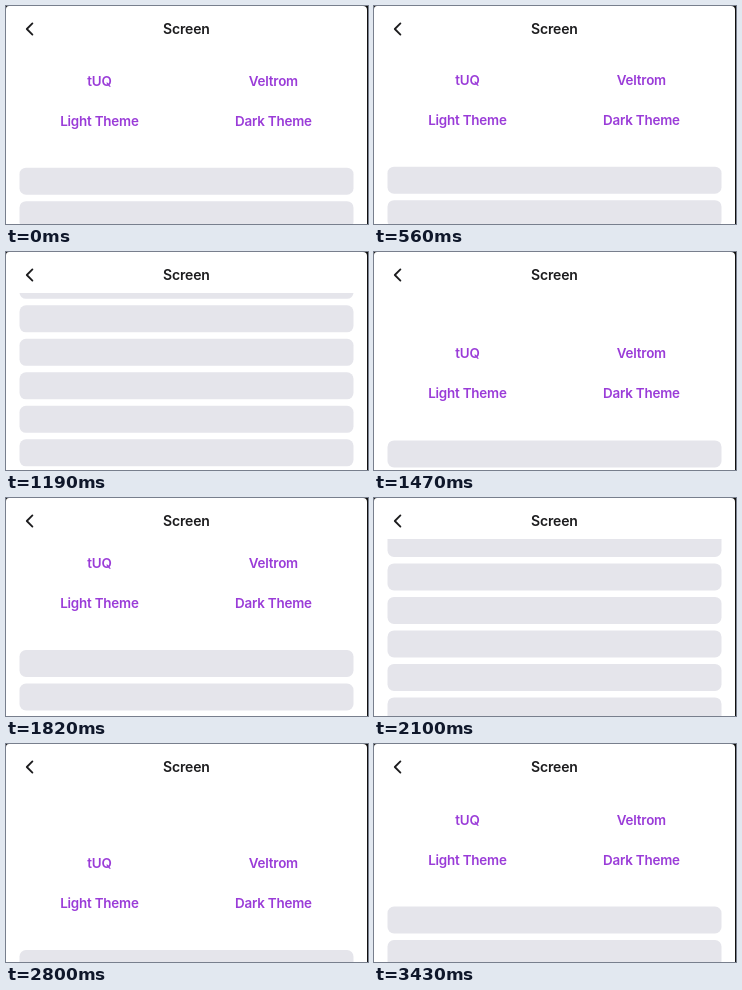
An HTML page that plays this animation: 362 px wide and 218 px high, repeating every 3500 ms.

```html
<!DOCTYPE html>
<html lang="en">
<head>
<meta charset="utf-8">
<title>Scrolling screen</title>
<style>
  html, body { margin: 0; width: 100%; height: 100%; overflow: hidden; background: #111; }
  svg { display: block; width: 362px; height: 218px; }
  text { font: 600 13.4px Inter, "Liberation Sans", sans-serif; letter-spacing: -.015em; text-anchor: middle; }
  .title { font-size: 14px; letter-spacing: -.01em; fill: #1c1c1e; }
  .links { fill: #9a3cd8; }
  .rows { fill: #e5e5eb; }
</style>
</head>
<body>
<svg viewBox="0 0 362 218">
  <defs>
    <clipPath id="view"><rect y="41" width="361" height="177"/></clipPath>
  </defs>
  <path d="M0 218V3Q0 0 3 0H357Q361 0 361 4V218Z" fill="#fff"/>
  <g clip-path="url(#view)">
    <g id="content">
      <g class="links">
        <text x="93.4" y="79.8">tUQ</text>
        <text x="267.4" y="79.8">Veltrom</text>
        <text x="93.4" y="119.8">Light Theme</text>
        <text x="267.4" y="119.8">Dark Theme</text>
      </g>
      <g class="rows" id="rows"></g>
    </g>
  </g>
  <path d="M26.4 17.4 20.8 23 26.4 28.6" fill="none" stroke="#1c1c1e" stroke-width="1.8" stroke-linecap="round" stroke-linejoin="round"/>
  <text class="title" x="180.4" y="28">Screen</text>
</svg>
<script>
  const STEP = 70, LOOP = 3500;
  const ROWS = 16, PITCH = 33.5;
  const RELEASE = 2870, SPRING = 90;

  const content = document.getElementById('content');
  const rows = document.getElementById('rows');
  for (let i = 0; i < ROWS; i++) {
    const bar = document.createElementNS('http://www.w3.org/2000/svg', 'rect');
    const box = { x: 13.5, y: 161.7 + i * PITCH, width: 334, height: 27, rx: 6.5 };
    for (const key in box) bar.setAttribute(key, box[key]);
    rows.append(bar);
  }

  // Where each drag of the finger begins and ends
  const drags = [
    { start: 540, end: 1050, from: 0, to: -267 },
    { start: 1050, end: 1540, from: -267, to: 42 },
    { start: 1540, end: 1610, from: 42, to: 36 },
    { start: 1680, end: 2240, from: 36, to: -276 },
    { start: 2310, end: RELEASE, from: -276, to: 57 }
  ];

  const ease = p => (1 - Math.cos(Math.PI * p)) / 2;

  function scrollAt(t) {
    const drag = drags.findLast(d => t >= d.start);
    if (!drag) return 0;
    if (t > RELEASE) {
      const x = (t - RELEASE) / SPRING;
      return drag.to * (1 + x) * Math.exp(-x);
    }
    const p = Math.min(1, (t - drag.start) / (drag.end - drag.start));
    return drag.from + (drag.to - drag.from) * ease(p);
  }

  const begin = performance.now();
  function draw() {
    const t = Math.max(0, performance.now() - begin) % LOOP;
    const y = scrollAt(Math.floor(t / STEP) * STEP);
    content.setAttribute('transform', `translate(0 ${y.toFixed(2)})`);
    requestAnimationFrame(draw);
  }
  draw();
</script>
</body>
</html>
```
